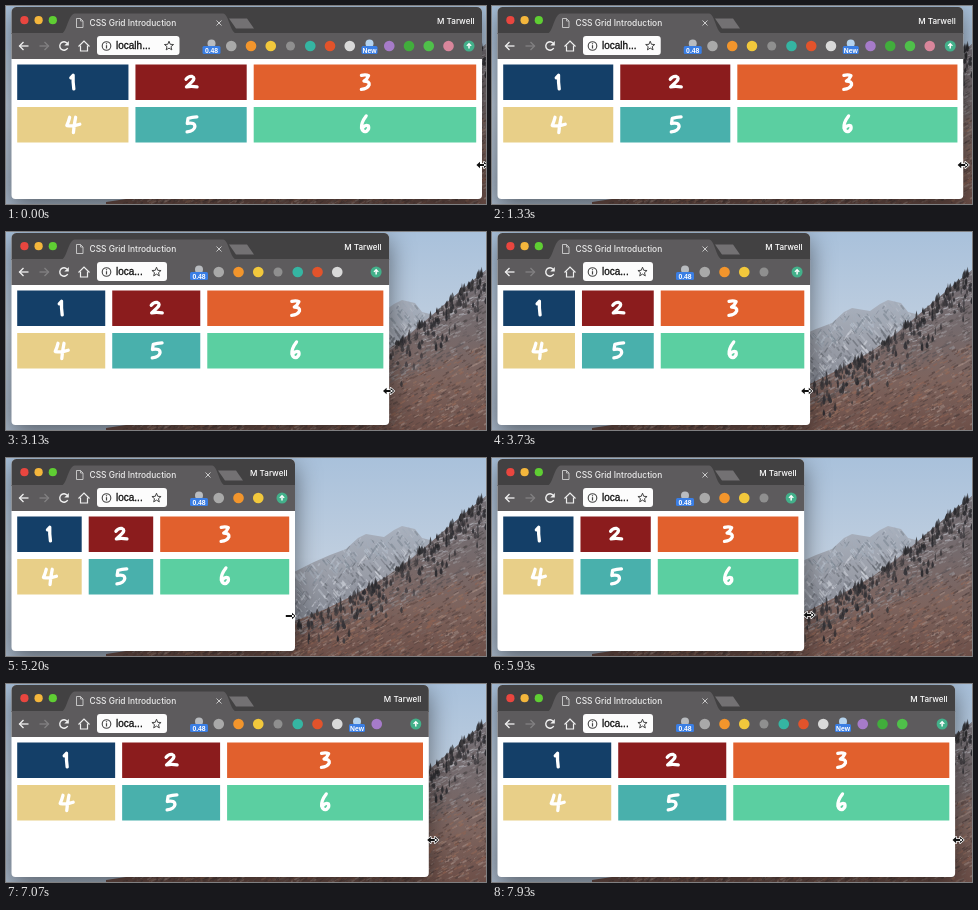
Animation, 480 px wide and 198 px high, one loop 8000 ms. Source, as an HTML page with a canvas:

```html
<!DOCTYPE html>
<html lang="en">
<head>
<meta charset="utf-8">
<title>CSS Grid Introduction</title>
<style>
html, body { margin: 0; width: 100%; height: 100%; overflow: hidden; background: #afc6df; }
canvas { display: block; width: 100vw; height: 100vh; }
</style>
</head>
<body>
<canvas id="stage"></canvas>
<script>
const W = 480, H = 198, LOOP = 8000, STEP = 1000 / 15;
const LEFT = 5.5, TOP = 1, BOTTOM = 193, MIN_RIGHT = 289;
const UI = 'Inter, "Open Sans", sans-serif';
const ARIAL = '"Liberation Sans", Arial, sans-serif';
const dpr = window.devicePixelRatio || 1;

// [ms, value] keys
const edgeKeys = [[0, 476], [530, 476], [2400, 453], [3730, 318.3], [4400, 289], [5200, 289], [5930, 312], [7070, 423], [7930, 463], [8000, 465]];
const cursorKeys = [[0, 476], [530, 476], [2400, 453], [3730, 315], [4530, 274], [4870, 274], [5200, 284], [5930, 317], [7070, 427], [7930, 466], [8000, 468]];
const heightKeys = [[0, 159], [3730, 159], [5200, 158], [5930, 157], [7070, 156], [8000, 156]];

function makeCanvas(canvas) {
  canvas.width = Math.round(W * dpr);
  canvas.height = Math.round(H * dpr);
  const context = canvas.getContext('2d');
  context.scale(dpr, dpr);
  return context;
}

const stage = document.getElementById('stage');
const ctx = makeCanvas(stage);
const wallpaper = document.createElement('canvas');
paintWallpaper(makeCanvas(wallpaper));

// Monotone cubic interpolation
function track(keys, t) {
  const slope = i => (keys[i + 1][1] - keys[i][1]) / (keys[i + 1][0] - keys[i][0]);
  const tangent = i => {
    if (i === 0) return slope(0);
    if (i === keys.length - 1) return slope(i - 1);
    const a = slope(i - 1), b = slope(i);
    return a * b <= 0 ? 0 : 2 * a * b / (a + b);
  };
  let i = 0;
  while (i < keys.length - 2 && t >= keys[i + 1][0]) i++;
  const span = keys[i + 1][0] - keys[i][0];
  const u = (t - keys[i][0]) / span, v = 1 - u;
  return keys[i][1] * (1 + 2 * u) * v * v + keys[i + 1][1] * u * u * (3 - 2 * u)
    + span * (tangent(i) * u * v * v - tangent(i + 1) * u * u * v);
}

function seeded(seed) {
  return () => {
    seed = (seed * 16807) % 2147483647;
    return seed / 2147483647;
  };
}

function trace(c, points) {
  c.beginPath();
  points.forEach(([x, y], i) => i ? c.lineTo(x, y) : c.moveTo(x, y));
}

function heightAt(line, x) {
  let i = 0;
  while (i < line.length - 2 && x > line[i + 1][0]) i++;
  const [x0, y0] = line[i], [x1, y1] = line[i + 1];
  return y0 + (y1 - y0) * (x - x0) / (x1 - x0);
}

function paintWallpaper(c) {
  const rand = seeded(4127);
  const far = [[200, 150], [270, 124], [290, 113], [308, 104], [324, 97], [340, 91], [352, 80], [360, 76], [378, 79], [388, 72], [396, 68], [409, 71], [416, 80], [432, 84], [480, 90]];
  const near = [[100, 196], [200, 181], [289, 163], [320, 151], [350, 136], [380, 119], [405, 101], [425, 84], [440, 71], [452, 61], [465, 50], [480, 38]];
  const ground = (line, fill) => {
    trace(c, [...line, [W, H], [line[0][0], H]]);
    c.fillStyle = fill;
    c.fill();
  };
  const gradient = (y0, y1, ...stops) => {
    const g = c.createLinearGradient(0, y0, 0, y1);
    stops.forEach((s, i) => g.addColorStop(i / (stops.length - 1), s));
    return g;
  };
  const pick = list => list[Math.floor(rand() * list.length)];
  const streak = (x, y, dx, dy, color, width, alpha) => {
    c.globalAlpha = alpha;
    c.strokeStyle = color;
    c.lineWidth = width;
    trace(c, [[x, y], [x + dx, y + dy]]);
    c.stroke();
  };
  c.lineCap = 'round';

  c.fillStyle = gradient(0, H, '#a9c1db', '#bfcedf', '#a8b7c9');
  c.fillRect(0, 0, W, H);

  // Snowy range, paler towards the crest
  ground(far, gradient(68, 160, '#a9b1be', '#9b9fa9', '#858994'));
  c.save();
  trace(c, [...far, [W, H], [200, H]]);
  c.clip();
  for (let i = 0; i < 900; i++) {
    const x = 265 + rand() * 185;
    const depth = rand();
    const len = 1 + rand() * 5;
    const lean = rand() < 0.65 ? 0.8 : -0.7;
    const color = pick(depth < 0.3 ? ['#7e8793', '#b9c2cd', '#a2acb9'] : ['#62666f', '#757982', '#cdd1d9', '#b6bbc5', '#8c9099']);
    streak(x, heightAt(far, x) + depth * 70, len * lean, len, color, 0.7 + rand() * 1.4, 0.6);
  }
  c.restore();

  // Brown slope
  c.globalAlpha = 1;
  ground(near, gradient(45, 198, '#746f75', '#756a6c', '#7d645e', '#6d4f48'));
  c.save();
  trace(c, [...near, [W, H], [100, H]]);
  c.clip();
  for (let i = 0; i < 2400; i++) {
    const x = 110 + 370 * Math.sqrt(rand());
    const y0 = heightAt(near, x);
    const depth = rand();
    const len = 0.5 + rand() * 4;
    const color = pick(depth < 0.45
      ? ['#8b8588', '#5b5457', '#9b9699', '#6c6163', '#4e4849']
      : ['#95705f', '#8f6353', '#5c4642', '#a28a82', '#78645f', '#4d3e3c']);
    streak(x, y0 + depth * (H - y0), len, -len * 0.55, color, 0.6 + rand() * 1.3, 0.6);
  }
  for (let i = 0; i < 90; i++) {
    const x = 410 + rand() * 70;
    streak(x, heightAt(near, x) + rand() * 30, 2 + rand() * 3, -1, pick(['#b9bbc2', '#a4a5ac']), 0.8, 0.7);
  }
  c.restore();

  // Conifers thin out below the ridge
  for (let i = 0; i < 260; i++) {
    const x = 292 + 188 * Math.pow(rand(), 0.8);
    const y = heightAt(near, x) + 1 + rand() * rand() * 48;
    const h = 2.5 + rand() * 5.5, w = 1 + rand() * 1.4;
    c.globalAlpha = 0.6 + rand() * 0.35;
    c.fillStyle = pick(['#29292d', '#333236', '#3d3a3d']);
    c.beginPath();
    c.moveTo(x, y - h);
    c.quadraticCurveTo(x + w * 1.6, y, x, y + 1.5);
    c.quadraticCurveTo(x - w * 1.6, y, x, y - h);
    c.fill();
  }
}

function box(x, y, w, h, r, fill) {
  ctx.beginPath();
  ctx.roundRect(x, y, w, h, r);
  ctx.fillStyle = fill;
  ctx.fill();
}

function disc(x, y, r, fill) {
  ctx.beginPath();
  ctx.arc(x, y, r, 0, 2 * Math.PI);
  ctx.fillStyle = fill;
  ctx.fill();
}

function line(points, color, width) {
  trace(ctx, points);
  ctx.strokeStyle = color;
  ctx.lineWidth = width;
  ctx.stroke();
}

function label(text, x, y, font, color, align = 'left') {
  ctx.font = font;
  ctx.fillStyle = color;
  ctx.textAlign = align;
  ctx.textBaseline = 'alphabetic';
  ctx.fillText(text, x, y);
}

function drawTitleBar(right) {
  box(LEFT, TOP, right - LEFT, 27, [5, 5, 0, 0], '#424142');
  ['#e9463f', '#f4b63c', '#5fce33'].forEach((color, i) => disc(18.4 + 14.2 * i, 14.2, 4.1, color));

  const close = Math.min(213, right - 87);
  ctx.beginPath();
  ctx.moveTo(55, 28);
  ctx.bezierCurveTo(61, 27, 62, 8, 69, 7.5);
  ctx.lineTo(close + 4, 7.5);
  ctx.bezierCurveTo(close + 10, 8, close + 11, 27, close + 18, 28);
  ctx.fillStyle = '#5d5b5d';
  ctx.fill();

  trace(ctx, [[close + 10, 12.5], [close + 28, 12.5], [close + 35, 22.5], [close + 17, 22.5]]);
  ctx.fillStyle = '#737173';
  ctx.fill();

  line([[70.5, 12.5], [74.5, 12.5], [77, 15], [77, 21.5], [70.5, 21.5], [70.5, 12.5]], '#d0d0d0', 0.9);
  line([[74.5, 12.5], [74.5, 15], [77, 15]], '#d0d0d0', 0.8);
  label('CSS Grid Introduction', 83.5, 20, '500 8.4px ' + UI, '#ececec');
  line([[close - 2.5, 14.5], [close + 2.5, 19.5]], '#c8c8c8', 1);
  line([[close + 2.5, 14.5], [close - 2.5, 19.5]], '#c8c8c8', 1);
  label('M Tarwell', right - 7.5, 17.5, '500 8.1px ' + UI, '#fff', 'right');
}

function drawNavigation() {
  const arrow = (x, dir, color) => {
    line([[x - 4.5, 40], [x + 4.5, 40]], color, 1.3);
    line([[x + dir * 0.5, 36], [x + dir * 4.5, 40], [x + dir * 0.5, 44]], color, 1.3);
  };
  arrow(18, -1, '#f0f0f0');
  arrow(38, 1, '#828082');
  ctx.beginPath();
  ctx.arc(58, 40, 4.2, 0.5, 5.5);
  ctx.strokeStyle = '#f0f0f0';
  ctx.lineWidth = 1.4;
  ctx.stroke();
  trace(ctx, [[62.8, 35], [62.8, 39.5], [58.3, 39.5]]);
  ctx.fillStyle = '#f0f0f0';
  ctx.fill();
  line([[72.5, 40.5], [78, 35], [83.5, 40.5]], '#f0f0f0', 1.2);
  line([[74.5, 39.5], [74.5, 45], [81.5, 45], [81.5, 39.5]], '#f0f0f0', 1.2);
}

function drawAddress(extra) {
  box(91, 30, 70 + extra, 19, 3, '#fcfcfc');
  ctx.beginPath();
  ctx.arc(100.5, 40, 4.3, 0, 2 * Math.PI);
  ctx.strokeStyle = '#444';
  ctx.lineWidth = 1.1;
  ctx.stroke();
  line([[100.5, 39.2], [100.5, 42.5]], '#444', 1.2);
  line([[100.5, 37.2], [100.5, 38.3]], '#444', 1.2);

  const font = '10px ' + ARIAL;
  ctx.font = font;
  let host = 'localhost';
  while (host && ctx.measureText(host + '...').width > 27.2 + extra) host = host.slice(0, -1);
  label(host + '...', 110, 43.3, font, '#111');
  ctx.strokeStyle = '#111';
  ctx.lineWidth = 0.3;
  ctx.strokeText(host + '...', 110, 43.3);

  const star = Array.from({ length: 11 }, (_, i) => {
    const a = i * Math.PI / 5 - Math.PI / 2, r = i % 2 ? 2.1 : 4.8;
    return [150.5 + extra + r * Math.cos(a), 40 + r * Math.sin(a)];
  });
  line(star, '#444', 1);
}

const extensions = ['#b9bcc0', '#a9a9a9', '#f2952c', '#f2c83c', '#8f8f8f', '#35b5a2', '#e2532b', '#d9d9d9', '#b5d3ee', '#a67bc9', '#41ad3c', '#4fc04a', '#d9869b'];

function badge(text, x, w) {
  box(x - w / 2, 40, w, 8, 1.5, '#3a7ee4');
  label(text, x, 46.6, 'bold 6.8px ' + ARIAL, '#fff', 'center');
}

function drawToolbar(right) {
  box(LEFT, 27, right - LEFT, 26, 0, '#5d5b5d');
  const first = 193, pitch = 19.75, menu = right - 13;
  const room = menu - 20.5 - first;
  const count = Math.min(extensions.length, Math.floor(room / pitch) + 1);
  const extra = count === extensions.length ? room - pitch * (count - 1) : 0;

  drawNavigation();
  drawAddress(extra);
  for (let i = 0; i < count; i++) {
    const x = first + extra + pitch * i;
    const hasBadge = i === 0 || i === 8;
    disc(x, hasBadge ? 37.5 : 40, hasBadge ? 4 : i === 4 ? 4.5 : 5.3, extensions[i]);
    if (i === 0) badge('0.48', x, 18);
    if (i === 8) badge('New', x, 16);
  }
  disc(menu, 40, 5.5, '#43b08a');
  line([[menu, 42.5], [menu, 38]], '#fff', 1.5);
  line([[menu - 2.2, 39.9], [menu, 37.7], [menu + 2.2, 39.9]], '#fff', 1.3);
}

// Brush strokes around each digit's centre
const digits = [
  'M-2-4.3 L.3-6.8 Q0 0 1 6.8',
  'M-5-2.8 Q-2.5-6.2 1-5.6 Q4.8-4 .8-.2 L-4.6 4.8 Q0 3.6 6 4.8',
  'M-3.5-6.8 Q1-8 3.6-6.4 Q2.5-3.4-1-1 Q5-1 4.2 2.8 Q2.5 6.8-3.6 7.2',
  'M-3.2-7.2 Q-4.2-3-6 1 Q1 2 7-.2 M2.8-7.2 Q1.2 0 .6 8',
  'M5.8-7.6 Q1-7.2-3-6.2 L-3.8-1 Q3.8-2.4 3.8 2.2 Q3 6.4-4 7.4',
  'M1.2-8.6 Q-4-2-3.4 3.6 Q-2 8 1.4 7 Q4.8 4.4 3.4 1.4 Q.8-.4-2.6 3.6'
].map(d => new Path2D(d));
const colors = ['#143f68', '#8b1c1d', '#e1602d', '#e8cf88', '#49b0ac', '#5bcfa1'];

function drawGrid(right) {
  const x0 = 11.2, gap = 7, fr = (right - 5.8 - x0 - 2 * gap) / 4;
  colors.forEach((color, i) => {
    const col = i % 3, row = Math.floor(i / 3);
    const x = x0 + col * (fr + gap), y = 58.6 + row * 42.4;
    const w = col === 2 ? 2 * fr : fr;
    box(x, y, w, 35.5, 0, color);
    ctx.save();
    ctx.translate(x + w / 2, y + 17.5);
    ctx.lineCap = ctx.lineJoin = 'round';
    ctx.strokeStyle = '#fff';
    ctx.lineWidth = 3.3;
    ctx.stroke(digits[i]);
    ctx.restore();
  });
}

function drawCursor(x, y, onlyRight) {
  const shape = () => {
    ctx.beginPath();
    const head = dir => {
      ctx.moveTo(x + dir * 5.6, y);
      ctx.lineTo(x + dir * 2, y - 3.3);
      ctx.lineTo(x + dir * 2, y + 3.3);
      ctx.closePath();
    };
    head(1);
    if (!onlyRight) head(-1);
    ctx.rect(x - 4.2, y - 1.1, 8, 2.2);
  };
  shape();
  ctx.lineJoin = 'round';
  ctx.strokeStyle = '#fff';
  ctx.lineWidth = 1.5;
  ctx.stroke();
  shape();
  ctx.fillStyle = '#111';
  ctx.fill();
  ctx.lineJoin = 'miter';
}

function draw(t) {
  const right = track(edgeKeys, t), pointer = track(cursorKeys, t);
  ctx.drawImage(wallpaper, 0, 0, W, H);

  ctx.save();
  ctx.shadowColor = 'rgba(0, 0, 0, 0.5)';
  ctx.shadowBlur = 24 * dpr;
  ctx.shadowOffsetY = 7 * dpr;
  box(LEFT, TOP, right - LEFT, BOTTOM - TOP, [5, 5, 4, 4], '#fff');
  ctx.restore();

  drawTitleBar(right);
  drawToolbar(right);
  drawGrid(right);
  drawCursor(pointer, track(heightKeys, t), right < MIN_RIGHT + 0.5);
}

const start = performance.now();
function tick(now) {
  const t = Math.max(0, now - start) % LOOP;
  draw(Math.min(Math.floor((t + 5) / STEP), 119) * STEP);
  requestAnimationFrame(tick);
}
draw(0);
requestAnimationFrame(tick);
</script>
</body>
</html>
```
